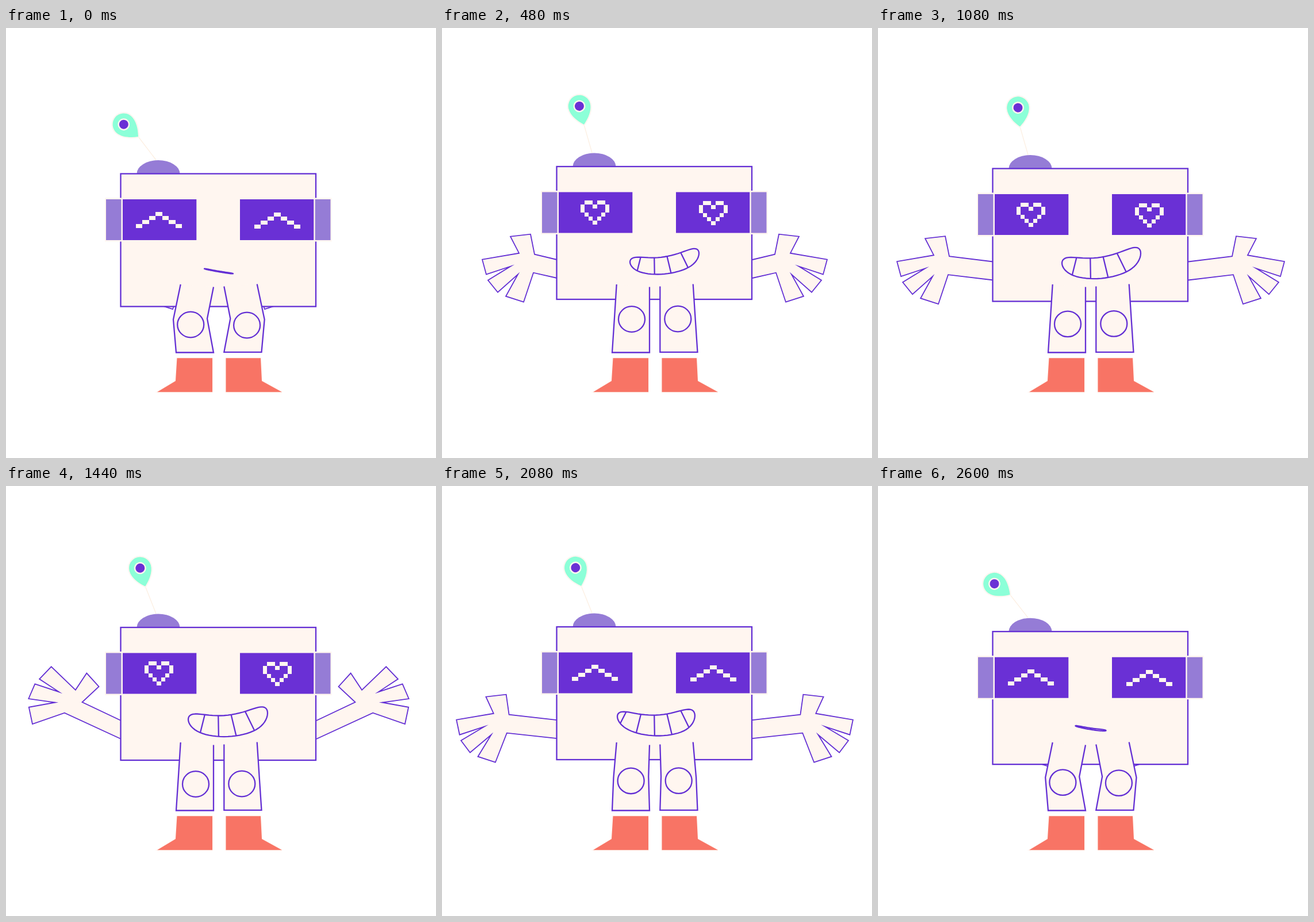
An HTML page that plays this animation: 748x748 px, repeating every 2.64 s.

```html
<!DOCTYPE html>
<html lang="en">
<head>
<meta charset="utf-8">
<title>Waving robot</title>
<style>
html, body { margin: 0; width: 100%; height: 100%; overflow: hidden; background: #fff; }
svg { display: block; width: 100%; height: 100%; }
.skin { fill: #fff6f0; stroke: #632fd4; stroke-width: 2.3; }
.arm { stroke-width: 1.8; stroke-miterlimit: 10; }
.cream { fill: #fff6f0; }
.lilac { fill: #957cd6; }
.violet { fill: #6a30d5; }
.boot { fill: #f87465; stroke: #fff6f0; stroke-width: 2; paint-order: stroke; }
.mint { fill: #8cffd8; stroke: #fff6f0; stroke-width: 4; paint-order: stroke; }
</style>
</head>
<body>
<svg viewBox="0 0 748 748">
  <defs><clipPath id="lips"><path id="lipsShape"/></clipPath></defs>
  <path id="armL" class="skin arm"/>
  <path id="armR" class="skin arm" transform="translate(740) scale(-1 1)"/>
  <g id="head">
    <g id="stalk">
      <path d="M0 0V-51" stroke="#fcefe2" stroke-width="1.3"/>
      <g id="drop">
        <path class="mint" d="M0 0C-9 -8 -19.3 -20 -19.3 -33A19.3 19.3 0 0 1 19.3 -33C19.3 -20 9 -8 0 0Z"/>
        <circle class="cream" cy="-33" r="10.5"/>
        <circle class="violet" cy="-33" r="8"/>
      </g>
    </g>
    <path class="lilac" d="M227.5 0A37.5 23.5 0 0 1 302.5 0Z"/>
    <rect class="skin" x="199.5" width="339.5" height="231"/>
    <path class="cream" d="M172 42H333V118H172ZM405 42H566.500V118H405Z"/>
    <path class="lilac" d="M174 44.500H200.500V115.500H174ZM537.700 44.500H564.500V115.500H537.700Z"/>
    <path class="violet" d="M203 44.500H331.300V115.500H203ZM407 44.500H535.300V115.500H407Z"/>
    <path id="eyes" class="cream" shape-rendering="crispEdges"/>
  </g>
  <path id="mouth" class="skin" stroke-linejoin="round"/>
  <path clip-path="url(#lips)" stroke="#632fd4" stroke-width="2.3" fill="none"
    d="M327 380L306 421M349 385L336 437M369 385L370 442M388.500 385L402 441M411 382L433 427"/>
  <path id="legL" class="skin"/>
  <path id="legR" class="skin"/>
  <ellipse id="kneeL" class="skin" rx="23" ry="22.300"/>
  <ellipse id="kneeR" class="skin" rx="23" ry="22.300"/>
  <path class="boot" d="M297.500 574.300H359V633.300H263L295 614Z"/>
  <path class="boot" d="M382.500 574.300H443L445 614L480 633.300H382.500Z"/>
</svg>
<script>
const LOOP = 2640, STEP = 40;
const el = id => document.getElementById(id);
const set = (id, name, value) => el(id).setAttribute(name, value);
const line = points => 'M' + points.map(p => p.map(v => v.toFixed(2)).join(' ')).join('L');

// smooth curve through key values that never overshoots them
function curve(times, values) {
  const last = times.length - 1;
  const rate = k => (values[k + 1] - values[k]) / (times[k + 1] - times[k]);
  const slope = k => {
    if (k === 0 || k === last) return 0;
    const p = rate(k - 1), q = rate(k);
    return p * q > 0 ? 2 * p * q / (p + q) : 0;
  };
  return t => {
    if (t <= times[0]) return values[0];
    if (t >= times[last]) return values[last];
    const i = times.findIndex(x => x > t) - 1;
    const span = times[i + 1] - times[i], u = (t - times[i]) / span, w = 1 - u;
    return values[i] + (values[i + 1] - values[i]) * u * u * (3 - 2 * u)
      + span * u * w * (w * slope(i) - u * slope(i + 1));
  };
}

// crouch, reach out, open, raise, open wide, fold, crouch
const BEATS = [0, 480, 1080, 1440, 1800, 2320, LOOP];
const beat = (...values) => curve(BEATS, values);
const pose = {
  top: beat(253.5, 241, 244.5, 246, 243.8, 247.2, 253.4),
  bend: beat(1, 0, 0, 0, 0, .42, 1),
  lean: beat(37.4, 16, 16, 21.6, 21.6, 22, 38.7),
  tilt: beat(49.8, 14, 6, 15.7, 19.5, 15.7, 57),
  grin: beat(50, 120, 137, 138, 138, 128, 50),
  lipX: beat(370, 387, 388.5, 386, 378, 370, 370),
  lipY: beat(423, 399.5, 400.5, 400.5, 399, 403, 422),
  slant: beat(8.5, -15, -17, -11, -3, 0, 8.5),
  lift: beat(0, 0, 0, 1, 0, 0, 0),
  skew: beat(0, 0, 0, 0, .13, 0, 0),
  handX: curve([260, 480, 1080, 1440, 1800, 2138, 2320, 2430], [260, 112, 75, 83, 68, 66, 150, 270])
};

// wrist, thumb, three fingers, wrist, around the palm
const HAND = [[49, -27], [42, -62], [7, -58], [22, -29], [-42, -18], [-35, 8], [7, -6],
  [-32, 18], [-15, 39], [20, 8], [-1, 46], [30, 56], [47, 5]];

function arm({ top, lift, skew, handX }) {
  const turn = lift * 56 * Math.PI / 180, c = Math.cos(turn), s = Math.sin(turn);
  const grow = 1 + .12 * lift, y = top + 179.7 - 69 * lift;
  const hand = HAND.map(([a, b]) => {
    const px = a / grow - skew * b, py = b * grow;
    return [handX + c * px - s * py, y + s * px + c * py];
  });
  return line([[200, top + 162], ...hand, [200, top + 194]]);
}

// a bent strip with rounded ends; it thickens as the grin widens
function mouth({ grin, lipX, lipY, slant }) {
  const half = .6 + .205 * (grin - 50), points = [];
  for (let i = 0; i < 64; i++) {
    const a = i * Math.PI / 32, s = Math.cos(a);
    const spine = lipY + slant * s / 2 + .9 * half * (1 - s * s);
    const thick = half * (1 + .12 * s) * Math.sqrt(Math.max(0, 1 - s ** 6));
    points.push([lipX + grin / 2 * s, spine + Math.sign(Math.sin(a)) * thick]);
  }
  return line(points) + 'Z';
}

// pixel art placed on both screens
function pixels(rows, w, h, top) {
  let d = '';
  [[266, 0], [472, 1]].forEach(([cx, dy]) => rows.forEach((row, j) => [...row].forEach((c, i) => {
    if (c === '#') d += `M${cx + (i - row.length / 2) * w} ${top + dy + j * h}h${w}v${h}h${-w}z`;
  })));
  return d;
}
const HAPPY = pixels(['...#...', '..#.#..', '.#...#.', '#.....#'], 11.45, 7, 66);
const HEART = pixels(['.##.##.', '#..#..#', '#.....#', '.#...#.', '..#.#..', '...#...'], 7.1, 7, 59);

function draw(t) {
  const now = {};
  for (const key in pose) now[key] = pose[key](t);
  const { top, bend, lean, tilt } = now;

  set('head', 'transform', `translate(0 ${top})`);
  set('stalk', 'transform', `translate(261 -24) rotate(${-lean})`);
  set('drop', 'transform', `translate(0 -51) rotate(${lean - tilt})`);
  set('eyes', 'd', t >= 240 && t < 1600 ? HEART : HAPPY);

  const limb = arm(now), lips = mouth(now);
  set('armL', 'd', limb);
  set('armR', 'd', limb);
  set('mouth', 'd', lips);
  set('lipsShape', 'd', lips);

  set('legL', 'd', line([[303.7, 446], [299.8 - 8.8 * bend, 507], [296, 564.5], [361, 564.5], [361 - 11 * bend, 505.5], [361, 450.5]]));
  set('legR', 'd', line([[436.7, 445.5], [440.7 + 9 * bend, 507], [444.5, 563.8], [379.3, 563.8], [379.3 + 11 * bend, 505.5], [379.3, 449.5]]));
  const knee = 506.5 + 2.4 * (top - 241) - 20 * bend;
  set('kneeL', 'cx', 330 - 8.8 * bend);
  set('kneeL', 'cy', knee - .5 * bend);
  set('kneeR', 'cx', 410.3 + 8.8 * bend);
  set('kneeR', 'cy', knee - .5 + bend);
}

const begin = performance.now();
function tick() {
  const t = (performance.now() - begin) % LOOP;
  draw(Math.floor(t / STEP) * STEP);
  requestAnimationFrame(tick);
}
tick();
</script>
</body>
</html>
```
